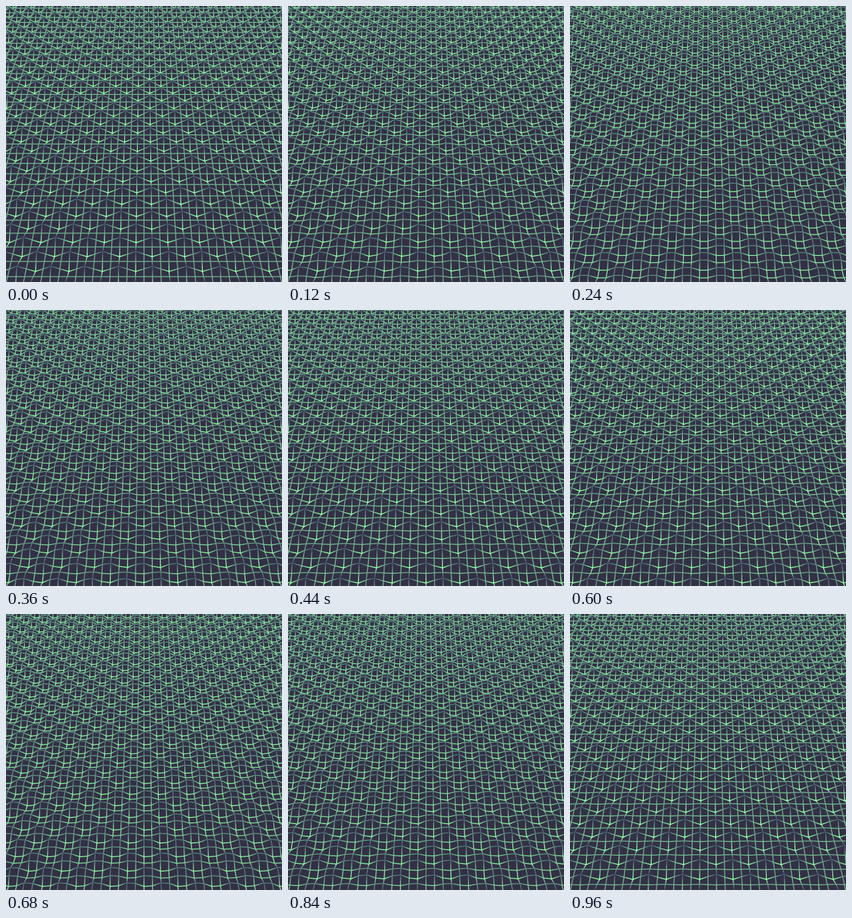
Write an HTML page with a canvas that moves like this. It is 540 by 540 pixels and loops after 1 s.

```html
<!DOCTYPE html>
<html lang="en">
<head>
<meta charset="utf-8">
<title>Rippling grid</title>
<style>
  html, body { margin: 0; width: 100%; height: 100%; overflow: hidden; background: #333045; }
  canvas { display: block; }
</style>
</head>
<body>
<canvas id="stage" width="540" height="540"></canvas>
<script>
const SIZE = 540, MID = SIZE / 2;
const LOOP = 1000, STEPS = 25;
const BACK = '#333045', WEIGHT = 2;
const LOW = [150, 255, 165], HIGH = [64, 78, 104];

// Camera looks down at 45 degrees; lengths are in grid cells.
const FOCAL = 873, DIST = 67.9, TILT = Math.SQRT1_2;
const AMP = 0.3;
const COLS = 36, FAR = -48, NEAR = 26;

function height(c, r, t) {
  const q = Math.PI / 2;
  return AMP * (Math.cos(q * (c - r)) - Math.cos(q * (c + r) - 2 * Math.PI * t));
}

function project(c, r, t) {
  const h = height(c, r, t);
  const scale = FOCAL / (DIST - (r + h) * TILT);
  const k = (h / AMP + 2) / 4;
  return {
    x: MID + c * scale,
    y: MID + (r - h) * TILT * scale,
    color: `rgb(${LOW.map((v, i) => Math.round(v + (HIGH[i] - v) * k))})`
  };
}

function outside(a, b) {
  const m = 4;
  return Math.max(a.x, b.x) < -m || Math.min(a.x, b.x) > SIZE + m ||
         Math.max(a.y, b.y) < -m || Math.min(a.y, b.y) > SIZE + m;
}

function segment(ctx, a, b) {
  if (outside(a, b)) return;
  if (a.color === b.color) {
    ctx.strokeStyle = a.color;
  } else {
    const g = ctx.createLinearGradient(a.x, a.y, b.x, b.y);
    g.addColorStop(0, a.color);
    g.addColorStop(1, b.color);
    ctx.strokeStyle = g;
  }
  ctx.beginPath();
  ctx.moveTo(a.x, a.y);
  ctx.lineTo(b.x, b.y);
  ctx.stroke();
}

function paint(ctx, t) {
  ctx.fillStyle = BACK;
  ctx.fillRect(0, 0, SIZE, SIZE);
  ctx.lineCap = 'round';
  ctx.lineWidth = WEIGHT;
  let prev = null;
  for (let r = FAR; r <= NEAR; r++) {
    const row = [];
    for (let c = -COLS; c <= COLS; c++) row.push(project(c, r, t));
    row.forEach((p, i) => {
      if (prev) segment(ctx, prev[i], p);
      if (i) segment(ctx, row[i - 1], p);
    });
    prev = row;
  }
}

// Each step of the loop is painted once and kept.
const cache = [];
function picture(step) {
  if (!cache[step]) {
    const layer = document.createElement('canvas');
    layer.width = layer.height = SIZE;
    paint(layer.getContext('2d'), step / STEPS);
    cache[step] = layer;
  }
  return cache[step];
}

const screen2d = document.getElementById('stage').getContext('2d');
let start = null, shown = -1;

function show(step) {
  if (step === shown) return;
  screen2d.drawImage(picture(step), 0, 0);
  shown = step;
}

function tick(now) {
  if (start === null) start = now;
  show(Math.floor(((now - start) % LOOP) / LOOP * STEPS));
  requestAnimationFrame(tick);
}

show(0);
requestAnimationFrame(tick);
</script>
</body>
</html>
```
